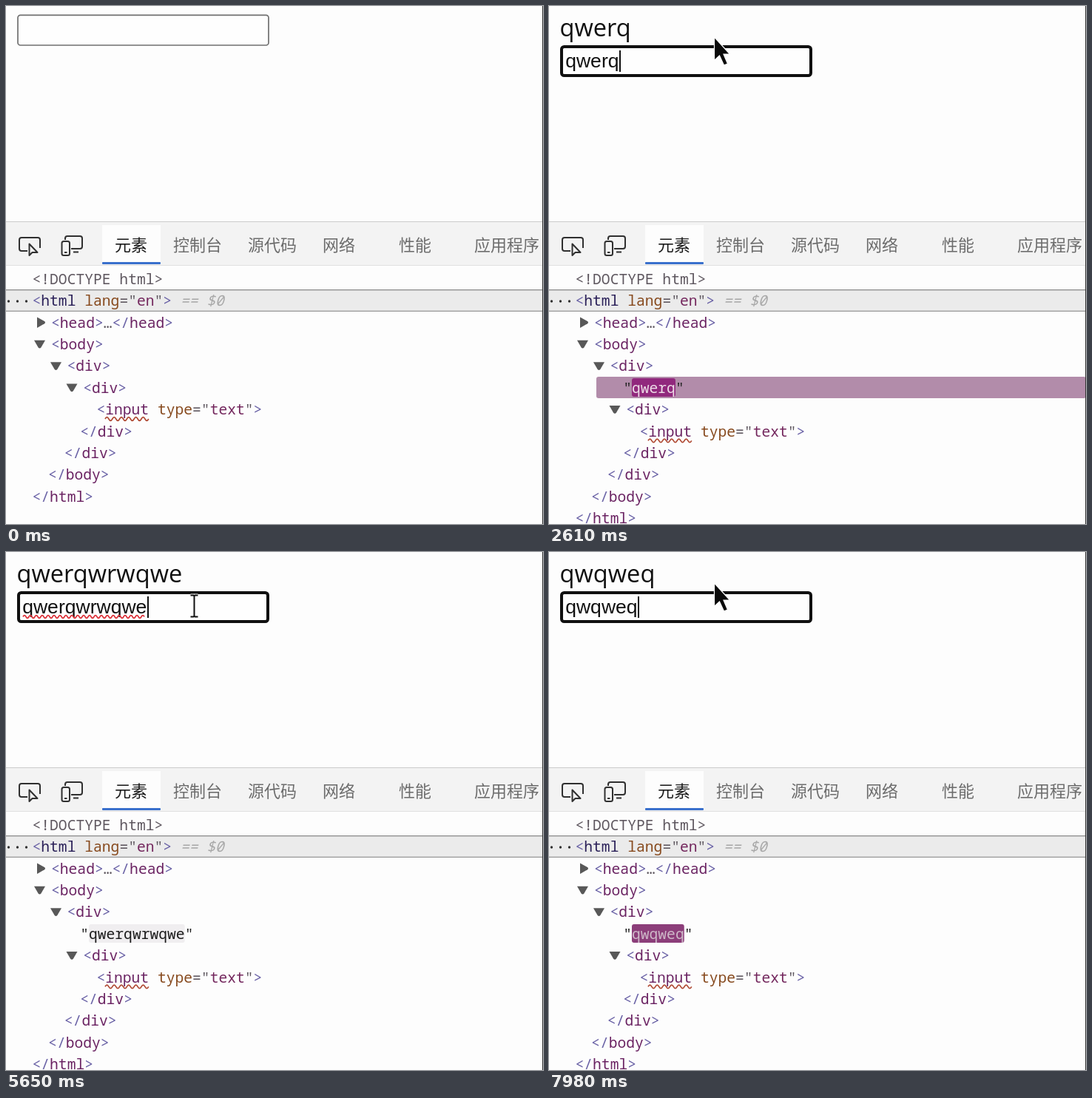
Recreate the animation shown at these times as an HTML page. Size 726 px wide and 700 px high, loop 8000 ms.

```html
<!DOCTYPE html>
<html lang="zh">
<head>
<meta charset="utf-8">
<title>Live text node</title>
<style>
  html, body { margin: 0; width: 100%; height: 100%; overflow: hidden; background: #fdfdfd; }
  svg { position: absolute; left: 0; top: 0; display: block; }
  text { white-space: pre; }
  .code text { font: 19.65px "Noto Sans Mono", "DejaVu Sans Mono", monospace; fill: #6a62a6; }
  .tabs text { font: 22px "Noto Sans CJK SC", "Noto Sans CJK", sans-serif; fill: #6c6c6c; }
  .tabs .on { fill: #1c1c1c; }
  .tag { fill: #6b2463; }
  .attr { fill: #874a1e; }
  .val { fill: #74285e; }
  .eq { fill: #5f5860; }
  .icon { fill: none; stroke: #303030; stroke-width: 2; stroke-linejoin: round; }
  .wave { fill: none; stroke-width: 1.7; }
  #page { font: 32.6px "Open Sans", "Noto Sans", sans-serif; fill: #101010; }
  #typed { font: 26.55px "Liberation Sans", Arial, sans-serif; fill: #101010; }
</style>
</head>
<body>
<svg width="726" height="700" viewBox="0 0 726 700">
  <rect width="726" height="700" fill="#fdfdfd"/>

  <text id="page" x="14.5" y="41"></text>
  <g id="field">
    <rect id="box" fill="#fefefe"/>
    <text id="typed" x="22.2" y="41.3"></text>
    <path id="spell" class="wave" stroke="#dc3038"/>
    <rect id="caret" y="18" width="2" height="29" fill="#101010"/>
  </g>

  <rect y="291" width="726" height="60" fill="#f3f3f3"/>
  <rect y="291" width="726" height="1" fill="#cbcbcb"/>
  <rect y="350" width="726" height="1" fill="#e0e0e0"/>
  <rect x="130" y="296" width="79" height="53" fill="#fdfdfd"/>
  <rect x="130" y="346" width="79" height="3" rx="1" fill="#3a70cc"/>
  <g class="icon">
    <path d="M29 331H21a3 3 0 0 1-3-3V316a3 3 0 0 1 3-3H43a3 3 0 0 1 3 3V327"/>
    <path d="M31.5 321.5V337L35.5 333H42.5Z" fill="#f3f3f3"/>
    <path d="M80 316V314a3 3 0 0 1 3-3H100a3 3 0 0 1 3 3V325a3 3 0 0 1-3 3H88M91 332.5H98"/>
    <rect x="75.5" y="318" width="10.5" height="19" rx="2.5"/>
    <path d="M79 333H82.5"/>
  </g>
  <g class="tabs" id="tabs"></g>

  <rect y="383" width="726" height="30" fill="#ebebeb"/>
  <rect y="383" width="726" height="1.3" fill="#8c8c8c"/>
  <rect y="411.7" width="726" height="1.3" fill="#9a9a9a"/>
  <g fill="#303030">
    <circle cx="3.5" cy="399" r="1.7"/><circle cx="15.5" cy="399" r="1.7"/><circle cx="27.5" cy="399" r="1.7"/>
  </g>

  <g class="code">
    <g id="head"></g>
    <g id="node">
      <rect id="row" x="64" y="501" width="662" height="29" rx="3"/>
      <rect id="mark" x="112" y="503" height="25" rx="3"/>
      <text id="node-text" x="100.2" y="522.8"></text>
    </g>
    <g id="tail"></g>
  </g>

  <rect x="725" width="1" height="700" fill="#383838"/>

  <g id="cursor">
    <path id="arrow" d="M0 0V31.5L7 25L13 38L18 36L12.5 23H21Z" fill="#0a0a0a" stroke="#fefefe" stroke-width="1.2"/>
    <g id="beam" fill="none">
      <path d="M26 16.5H30L31 17.5L32 16.5H36M31 17.5V44.5M26 45.5H30L31 44.5L32 45.5H36" stroke="#fefefe" stroke-width="4"/>
      <path d="M26 16.5H30L31 17.5L32 16.5H36M31 17.5V44.5M26 45.5H30L31 44.5L32 45.5H36" stroke="#101010" stroke-width="2"/>
    </g>
  </g>
</svg>

<script>
const LOOP = 8000, ROW = 29.4, LINE = 42, LAG = 90, FADE = 1400, CELL = 11.79;
const $ = id => document.getElementById(id);
const show = (el, on) => el.style.display = on ? '' : 'none';
const set = (el, attrs) => { for (const k in attrs) el.setAttribute(k, attrs[k]); };

// [time, word, letters present]
const A = 'qwerqwrwqwe', B = 'qwqweq';
const keys = [
  [1490, A, 1], [1740, A, 2], [1990, A, 3], [2250, A, 4], [2510, A, 5],
  [2900, A, 6], [3090, A, 7], [3350, A, 8], [3620, A, 9], [3910, A, 10], [4290, A, 11],
  [5750, A, 10], [5900, A, 9], [6060, A, 8], [6210, A, 7], [6370, A, 6],
  [6560, A, 5], [6720, A, 4], [6880, A, 3], [7040, A, 2],
  [7400, B, 3], [7560, B, 4], [7710, B, 5], [7840, B, 6]
].map(([at, word, n]) => ({ at, text: word.slice(0, n) }));
const lastKey = t => keys.filter(k => k.at <= t).pop();

// Highlight fade: [age, r, g, b]
const fillStops = [[0, 146, 34, 126], [50, 140, 62, 122], [310, 140, 68, 122],
                   [1030, 178, 140, 170], [1270, 240, 238, 240], [FADE, 253, 253, 253]];
const inkStops = [[0, 246, 230, 240], [50, 206, 184, 200], [310, 190, 166, 184],
                  [900, 70, 55, 66], [1270, 28, 28, 28]];
function fade(stops, age) {
  let i = 1;
  while (i < stops.length - 1 && age > stops[i][0]) i++;
  const a = stops[i - 1], b = stops[i];
  const u = Math.min(1, Math.max(0, (age - a[0]) / (b[0] - a[0])));
  return `rgb(${[1, 2, 3].map(c => Math.round(a[c] + (b[c] - a[c]) * u))})`;
}

function wave(x0, x1, y, step, h) {
  let d = `M${x0} ${y}`;
  for (let x = x0, s = -1; x + step <= x1; x += step, s = -s) d += `q${step / 2} ${s * h} ${step} 0`;
  return d;
}

const span = (cls, s) => `<tspan class="${cls}">${s}</tspan>`;
const open = name => '&lt;' + span('tag', name) + '&gt;';
const close = name => '&lt;/' + span('tag', name) + '&gt;';
const attr = (name, val) => ' ' + span('attr', name) + span('eq', '="') + span('val', val) + span('eq', '"');
const line = (i, x, html) => `<text x="${x}" y="${375.8 + i * ROW}">${html}</text>`;
const down = (x, i) => `<path d="M${x} ${363.6 + i * ROW}h15l-5.5 9.5q-2 2.5-4 0z" fill="#585858"/>`;

$('tabs').innerHTML = [['元素', 147], ['控制台', 226], ['源代码', 327], ['网络', 428], ['性能', 531], ['应用程序', 633]]
  .map(([s, x], i) => `<text x="${x}" y="331"${i ? '' : ' class="on"'}>${s}</text>`).join('');

$('head').innerHTML =
  line(0, 35.5, span('eq', '&lt;!DOCTYPE html&gt;')) +
  line(1, 35.5, '&lt;<tspan fill="#2a2058">html</tspan>' + attr('lang', 'en') + '&gt;' +
    ' <tspan fill="#a8a8a8" font-style="italic">== $0</tspan>') +
  '<path d="M42 420.5l10 5.6q2 1.6 0 3.2l-10 5.6z" fill="#585858"/>' +
  line(2, 61, open('head') + span('eq', '…') + close('head')) +
  down(38, 3) + line(3, 61, open('body')) +
  down(60, 4) + line(4, 82.5, open('div'));

$('tail').innerHTML =
  down(81.5, 5) + line(5, 104.2, open('div')) +
  line(6, 122.4, '&lt;' + span('tag', 'input') + attr('type', 'text') + '&gt;') +
  `<path class="wave" stroke="#b04a34" d="${wave(134, 193, 558, 4.9, 4.6)}"/>` +
  line(7, 100.2, close('div')) +
  line(8, 78.8, close('div')) +
  line(9, 57.1, close('body')) +
  line(10, 35.5, close('html'));

function drawField(t, key) {
  const text = key ? key.text : '', focus = t >= 790;
  $('page').textContent = $('typed').textContent = text;
  set($('field'), { transform: `translate(0 ${text ? LINE : 0})` });
  set($('box'), focus
    ? { x: 17, y: 13, width: 337, height: 39, rx: 3.5, stroke: '#101010', 'stroke-width': 4 }
    : { x: 16, y: 12.3, width: 339, height: 40.7, rx: 3.5, stroke: '#707070', 'stroke-width': 1.7 });

  const w = text ? $('typed').getComputedTextLength() : 0;
  const since = t - (key ? key.at : 810);
  const erasing = t > 5750 && t < 7400 && since < 60;
  set($('caret'), { x: Math.round(22.6 + w) });
  show($('caret'), since >= 0 && since % 1000 < 500 && !erasing);

  const misspelt = t >= 4880 && t < 5750;
  show($('spell'), misspelt);
  if (misspelt) set($('spell'), { d: wave(23, 22.5 + w, 45.5, 4, 3.6) });
}

function drawNode(t) {
  const key = lastKey(t - LAG);
  show($('node'), key);
  set($('tail'), { transform: `translate(0 ${key ? ROW : 0})` });
  if (!key) return;
  const age = t - LAG - key.at, rowAge = t - LAG - keys[0].at;
  show($('row'), rowAge < FADE);
  show($('mark'), age < FADE);
  set($('row'), { fill: fade(fillStops, rowAge) });
  set($('mark'), { fill: fade(fillStops, age), width: key.text.length * CELL });
  $('node-text').innerHTML =
    `<tspan fill="#222">"</tspan><tspan fill="${fade(inkStops, age)}">${key.text}</tspan><tspan fill="#222">"</tspan>`;
}

function drawCursor(t, key) {
  const left = (1 - Math.min(1, Math.max(0, (t - 50) / 600))) ** 3;
  const x = 223.5 + 416 * left, y = 42 + 648 * left;
  const beam = key ? key.text.length === A.length : x < 356 && y < 54;
  show($('cursor'), t >= 50);
  set($('cursor'), { transform: `translate(${x} ${y})` });
  show($('arrow'), !beam);
  show($('beam'), beam);
}

const start = performance.now();
function frame() {
  const t = (performance.now() - start) % LOOP;
  const key = lastKey(t);
  drawField(t, key);
  drawNode(t);
  drawCursor(t, key);
  requestAnimationFrame(frame);
}
frame();
</script>
</body>
</html>
```
